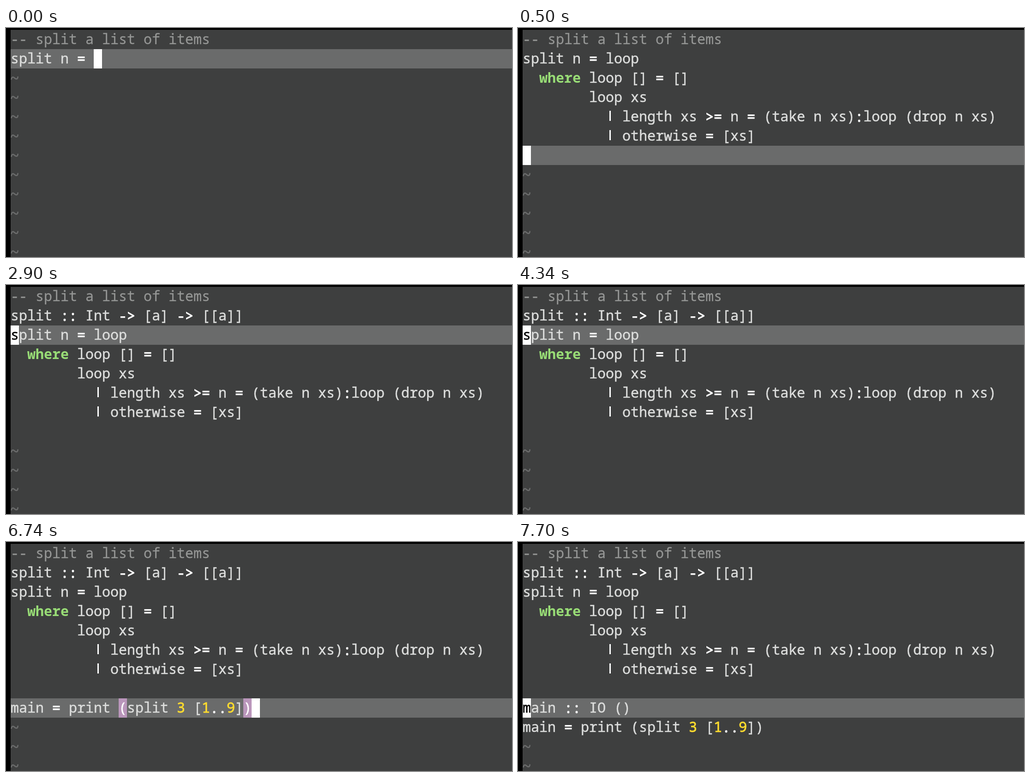
Write an HTML page that moves like this. It is 1096x498 px and loops after 8000 ms.

```html
<!DOCTYPE html>
<html lang="en">
<head>
<meta charset="utf-8">
<title>Editor session</title>
<style>
html, body { margin: 0; width: 100%; height: 100%; overflow: hidden; background: #000; }
#stage { position: relative; width: 1096px; height: 498px; overflow: hidden; }
#strip { animation: step 8s step-end infinite; }
@keyframes step {
  0% { transform: translateY(0); }
  6.25% { transform: translateY(-498px); }
  36.25% { transform: translateY(-996px); }
  66.25% { transform: translateY(-1494px); }
  96.25% { transform: translateY(-1992px); }
}
.scene {
  position: relative; box-sizing: border-box; height: 498px; overflow: hidden;
  border: solid #000; border-width: 4px 0 0 10px; background: #3e3f3f; color: #dcdddc;
  font: 30px/42px "Noto Sans Mono", "DejaVu Sans Mono", monospace;
  font-variant-ligatures: none; white-space: pre;
  -webkit-text-stroke: .5px currentColor;
}
.line { height: 42px; }
.current { background: #6a6b6b; }
.text, .cell b { position: relative; top: -1px; }
.comment { color: #959695; -webkit-text-stroke-width: .3px; }
.op { position: relative; top: 1px; color: #fff; -webkit-text-stroke-width: 1.2px; }
.key { color: #98dc76; font-weight: bold; -webkit-text-stroke-width: 0; }
.num { color: #ffdc2e; -webkit-text-stroke-width: .8px; }
.bar { color: transparent; background: linear-gradient(#fff, #fff) 8px 9px / 3px 22px no-repeat; }
.tilde { position: relative; left: -2px; top: 3px; font-size: 36px; line-height: 0; color: #6c6d6d; }
.cell { position: absolute; width: 18px; height: 42px; }
.cell b { font-weight: normal; }
.cursor { background: #fff; color: #000; }
.match { background: #ba96bb; color: #fff; }
</style>
</head>
<body>
<div id="stage"><div id="strip"></div></div>
<script>
const ROWS = 12, CELL_W = 18, ROW_H = 42;

const note = '-- split a list of items';
const type = 'split :: Int -> [a] -> [[a]]';
const body = [
  'split n = loop',
  '  where loop [] = []',
  '        loop xs',
  '          | length xs >= n = (take n xs):loop (drop n xs)',
  '          | otherwise = [xs]',
  ''
];
const main = 'main = print (split 3 [1..9])';

// cursor: [row, column]; match: highlighted columns in the cursor row
const scenes = [
  { lines: [note, 'split n = '], cursor: [1, 10] },
  { lines: [note, ...body], cursor: [6, 0] },
  { lines: [note, type, ...body], cursor: [2, 0] },
  { lines: [note, type, ...body, main], cursor: [8, 29], match: [13, 28] },
  { lines: [note, type, ...body, 'main :: IO ()', main], cursor: [8, 0] }
];

function add(parent, cls, text = '', tag = 'div') {
  const el = document.createElement(tag);
  el.className = cls;
  el.textContent = text;
  return parent.appendChild(el);
}

function kind(token) {
  if (token.startsWith('-- ')) return 'comment';
  if (token === 'where') return 'key';
  if (token === '|') return 'bar';
  if (/^\d/.test(token)) return 'num';
  return /^[-=>:.]/.test(token) ? 'op' : '';
}

function addCode(line, code) {
  const text = add(line, 'text', '', 'span');
  for (const token of code.match(/^-- .*|where|\d+|\||[-=>:.]+|[a-zA-Z]+|[^\w|=>:.-]+/g) || [])
    add(text, kind(token), token, 'span');
}

function addCell(scene, cls, row, col, char) {
  const cell = add(scene, 'cell ' + cls);
  cell.style.left = col * CELL_W + 'px';
  cell.style.top = row * ROW_H + 'px';
  add(cell, '', char, 'b');
}

for (const { lines, cursor: [row, col], match = [] } of scenes) {
  const scene = add(document.getElementById('strip'), 'scene');
  for (let i = 0; i < ROWS; i++) {
    const line = add(scene, i === row ? 'line current' : 'line');
    if (i < lines.length) addCode(line, lines[i]);
    else add(line, 'tilde', '~', 'span');
  }
  for (const c of match) addCell(scene, 'match', row, c, lines[row][c]);
  addCell(scene, 'cursor', row, col, lines[row][col] || '');
}
</script>
</body>
</html>
```
